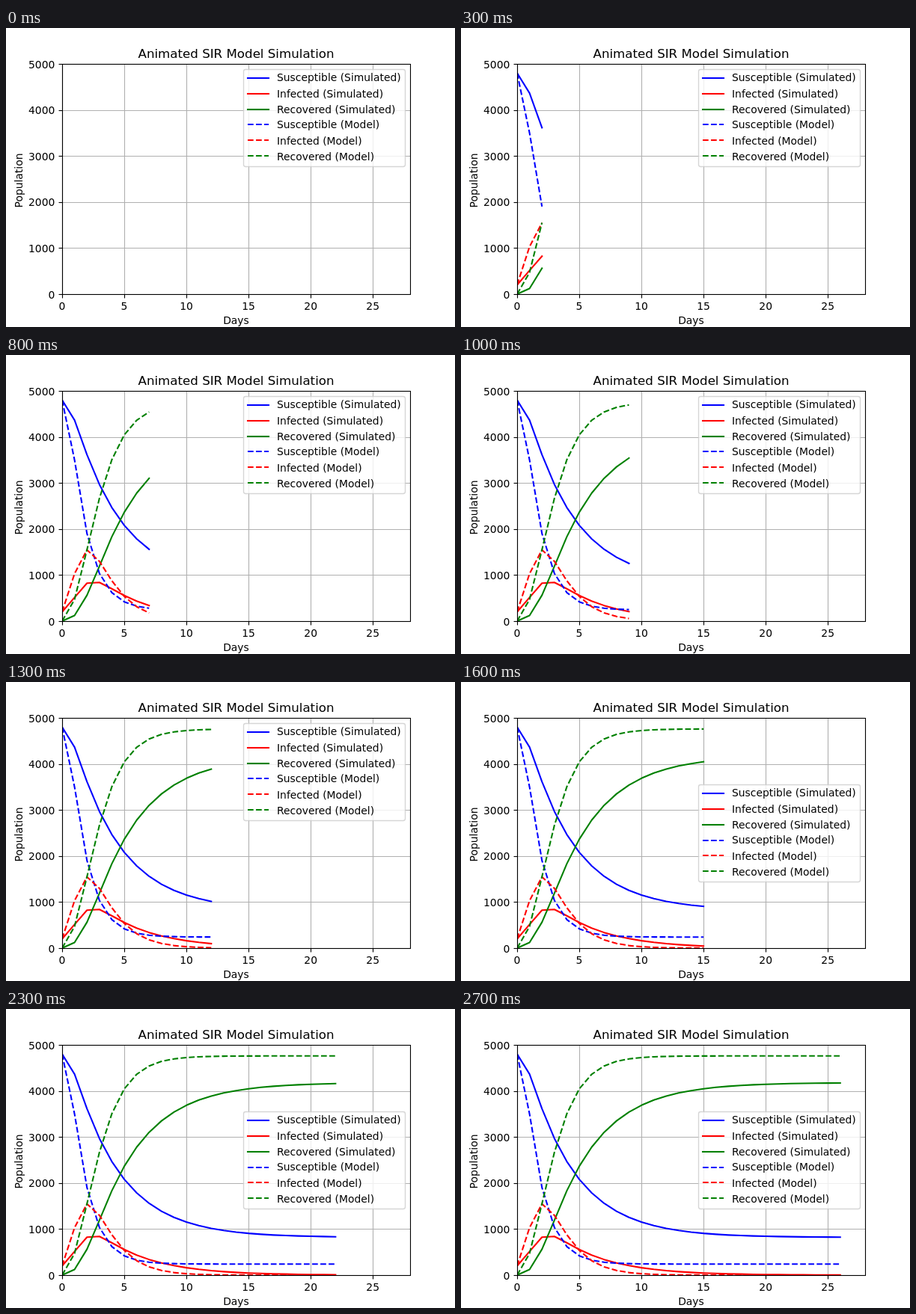
An HTML page with a canvas that plays this animation: 600 px wide and 400 px high, repeating every 2.8 s.

```html
<!DOCTYPE html>
<html lang="en">
<head>
<meta charset="utf-8">
<title>Animated SIR Model Simulation</title>
<style>
  html, body { margin: 0; width: 100%; height: 100%; overflow: hidden; background: #fff; }
  canvas { display: block; }
</style>
</head>
<body>
<canvas id="chart" width="600" height="400"></canvas>
<script>
const ctx = document.getElementById('chart').getContext('2d');

const STEP = 100, LOOP = 2800;
const POPULATION = 5000, LAST_DAY = 28;
const PLOT = { left: 75, top: 48, right: 540, bottom: 356 };
const PT = 100 / 72;
const FONT = '"DejaVu Sans", sans-serif';
const DASH = [5.55 * PT, 2.4 * PT];
const LEGEND_MOVE_DAY = 15;

// Falls from 1 to 0; the decay rate builds up to `rate` over about `ramp` days.
const fade = (day, rate, ramp) => Math.cosh(day / ramp) ** (-rate * ramp);

const simulated = {
  susceptible: d => 820 + 3980 * fade(d, 0.267, 1),
  infected: d => 1950 * Math.exp(-0.25 * d) / (1 + 8.75 * Math.exp(-1.5 * d)),
  recovered: d => POPULATION - simulated.susceptible(d) - simulated.infected(d)
};
const model = {
  susceptible: d => 240 + 4560 * fade(d, 0.745, 0.95),
  infected: d => POPULATION - model.susceptible(d) - model.recovered(d),
  recovered: d => 4760 * (1 - fade(d, 0.615, 2.9))
};

const makeSeries = (kind, curves, dash) => [
  { label: `Susceptible (${kind})`, color: '#0000ff', dash, value: curves.susceptible },
  { label: `Infected (${kind})`, color: '#ff0000', dash, value: curves.infected },
  { label: `Recovered (${kind})`, color: '#008000', dash, value: curves.recovered }
];
const series = [...makeSeries('Simulated', simulated, []), ...makeSeries('Model', model, DASH)];

const xOf = day => PLOT.left + day / LAST_DAY * (PLOT.right - PLOT.left);
const yOf = count => PLOT.bottom - count / POPULATION * (PLOT.bottom - PLOT.top);
const snap = v => Math.round(v) + 0.5;

const ticks = (count, step) => Array.from({ length: count }, (_, i) => i * step);
const xTicks = ticks(6, 5);
const yTicks = ticks(6, 1000);

function line(x1, y1, x2, y2) {
  ctx.beginPath();
  ctx.moveTo(x1, y1);
  ctx.lineTo(x2, y2);
  ctx.stroke();
}

function text(str, x, y, align = 'center', size = 10) {
  ctx.font = `${size * PT}px ${FONT}`;
  ctx.textAlign = align;
  ctx.fillStyle = '#000';
  ctx.fillText(str, x, y);
}

function setStroke(color, width, dash = [], cap = 'butt') {
  ctx.strokeStyle = color;
  ctx.lineWidth = width * PT;
  ctx.lineCap = cap;
  ctx.lineJoin = 'round';
  ctx.setLineDash(dash);
}

const setSeriesStroke = s => setStroke(s.color, 1.5, s.dash, s.dash.length ? 'butt' : 'square');

function drawGrid() {
  setStroke('#b0b0b0', 0.8);
  for (const d of xTicks) line(snap(xOf(d)), PLOT.top, snap(xOf(d)), PLOT.bottom);
  for (const c of yTicks) line(PLOT.left, snap(yOf(c)), PLOT.right, snap(yOf(c)));
}

function drawCurves(day) {
  if (day < 1) return;
  ctx.save();
  ctx.beginPath();
  ctx.rect(PLOT.left, PLOT.top, PLOT.right - PLOT.left, PLOT.bottom - PLOT.top);
  ctx.clip();
  for (const s of series) {
    setSeriesStroke(s);
    ctx.beginPath();
    for (let d = 0; d <= day; d++) ctx.lineTo(xOf(d), yOf(s.value(d)));
    ctx.stroke();
  }
  ctx.restore();
}

function drawAxes() {
  setStroke('#000', 0.8);
  const { left, top, right, bottom } = PLOT;
  for (const d of xTicks) {
    const x = snap(xOf(d));
    line(x, bottom + 0.5, x, bottom + 5.5);
    text(d, xOf(d), 377);
  }
  for (const c of yTicks) {
    const y = snap(yOf(c));
    line(left + 0.5, y, left - 4.5, y);
    text(c, 65.3, Math.ceil(yOf(c) + 5.06), 'right');
  }
  ctx.lineCap = 'square';
  ctx.lineJoin = 'miter';
  ctx.strokeRect(left + 0.5, top + 0.5, right - left, bottom - top);

  text('Animated SIR Model Simulation', 307.5, 40, 'center', 12);
  text('Days', 307.5, 396);
  ctx.save();
  ctx.translate(22, 204);
  ctx.rotate(-Math.PI / 2);
  text('Population', 0, 0);
  ctx.restore();
}

function drawLegend(top) {
  setStroke('rgba(204, 204, 204, 0.8)', 1);
  ctx.fillStyle = 'rgba(255, 255, 255, 0.8)';
  ctx.beginPath();
  ctx.roundRect(317.5, Math.round(top) + 0.5, 216, 130, 2.8);
  ctx.fill();
  ctx.stroke();
  series.forEach((s, i) => {
    const rowTop = top + i * 20.94;
    const lineY = Math.round(rowTop + 11.7);
    // Labels with a descender sit one pixel higher.
    const baseline = Math.ceil(rowTop + 16.5) - (s.label.includes('p') ? 1 : 0);
    setSeriesStroke(s);
    line(323, lineY, 351, lineY);
    text(s.label, 362, baseline, 'left');
  });
}

function draw(time) {
  const day = Math.floor(time % LOOP / STEP) - 1;
  ctx.fillStyle = '#fff';
  ctx.fillRect(0, 0, 600, 400);
  drawGrid();
  drawCurves(day);
  drawAxes();
  drawLegend(day < LEGEND_MOVE_DAY ? 54.94 : 137);
}

let start;
function tick(now) {
  start ??= now;
  draw(now - start);
  requestAnimationFrame(tick);
}
draw(0);
requestAnimationFrame(tick);
</script>
</body>
</html>
```
